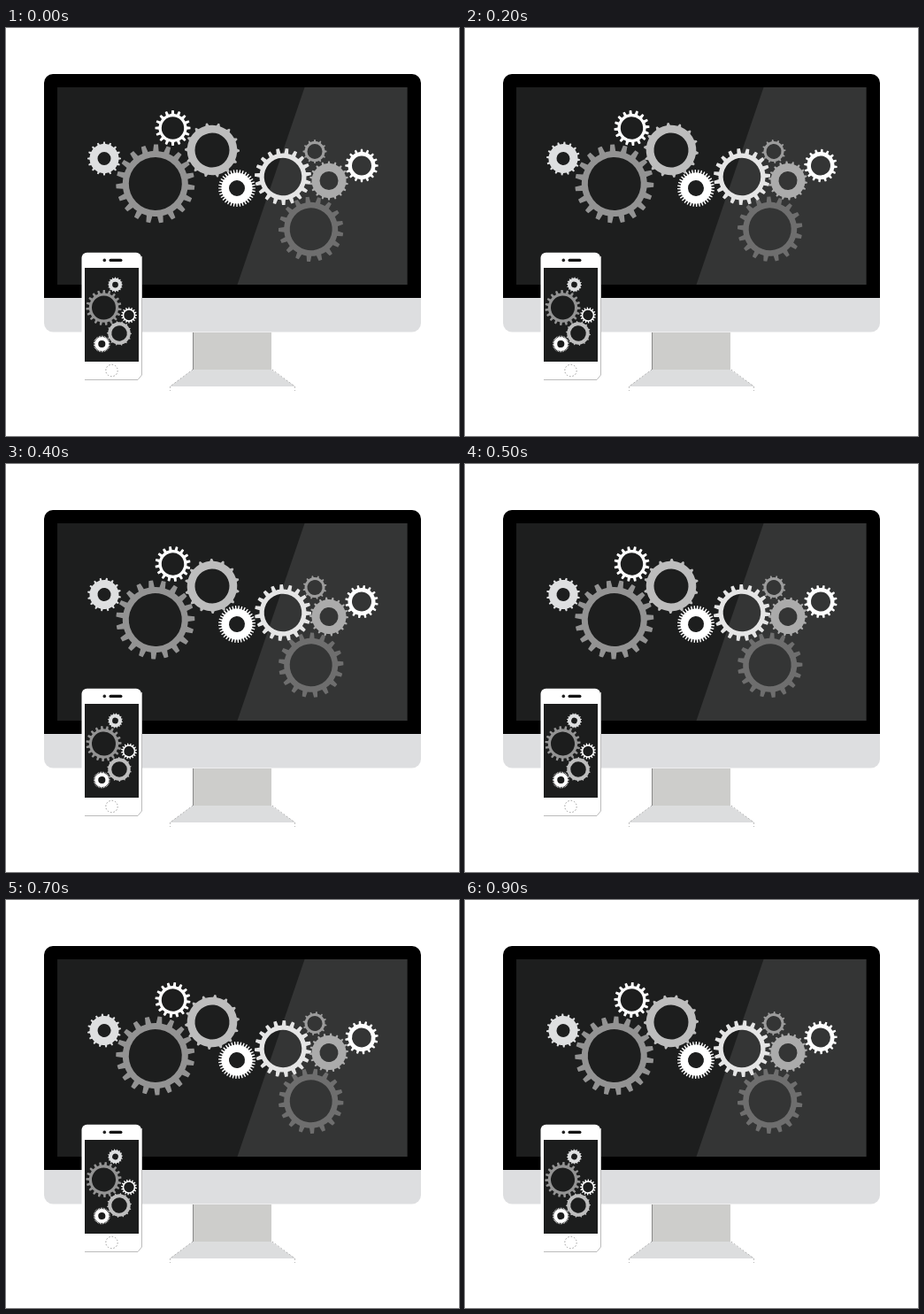
An HTML page with a canvas that plays this animation: 512x461 px, repeating every 1 s.

```html
<!DOCTYPE html>
<html lang="en">
<head>
<meta charset="utf-8">
<title>Gears on screens</title>
<style>
html, body { margin: 0; width: 100%; height: 100%; overflow: hidden; background: #fff; }
canvas { display: block; }
</style>
</head>
<body>
<canvas id="stage" width="512" height="461"></canvas>
<script>
const ctx = document.getElementById('stage').getContext('2d');
const TAU = Math.PI * 2;

// A negative tooth count turns the gear anticlockwise.
const kind = (hole, body, tip, teeth, fill, phase = 0) => ({ hole, body, tip, teeth, fill, phase });
const pale = kind(7.5, 16.5, 19, 16, '#dedfe0');
const big = kind(30, 37, 44.5, -19, '#939393', -0.05);
const thin = kind(12.7, 16, 20, -16, '#fff');
const light = kind(19.5, 28.3, 31, 14, '#bdbdbd', -0.45);
const fine = kind(9, 17.5, 21, -36, '#fff');
const wide = kind(21.3, 26.5, 32, 19, '#e5e5e5', 0.43);
const small = kind(8.5, 11.5, 13.5, -12, '#9c9c9c');
const grey = kind(10.5, 19.5, 22, -18, '#ababab');
const round = kind(11, 15.5, 18.7, 16, '#fff');
const dark = kind(24, 30.5, 36.7, 17, '#6e6e6e', -0.3);

function box(x, y, w, h, r, fill) {
  ctx.beginPath();
  ctx.roundRect(x, y, w, h, r);
  ctx.fillStyle = fill;
  ctx.fill();
}

function trace(...pts) {
  ctx.beginPath();
  for (const [x, y] of pts) ctx.lineTo(x, y);
}

function poly(fill, ...pts) {
  trace(...pts);
  ctx.fillStyle = fill;
  ctx.fill();
}

function stroke(color, dash = []) {
  ctx.lineWidth = 1;
  ctx.strokeStyle = color;
  ctx.setLineDash(dash);
  ctx.stroke();
}

function gear({ hole, body, tip, teeth, fill, phase }, x, y, turn, scale = 1) {
  const pitch = TAU / Math.abs(teeth);
  const top = Math.min(pitch * 0.17, (tip - body) * 0.32 / tip);
  const root = top + pitch * 0.1;
  ctx.save();
  ctx.translate(x, y);
  ctx.scale(scale, scale);
  ctx.rotate((phase + turn) * TAU / teeth - TAU / 4);
  ctx.beginPath();
  for (let a = 0; a < TAU - pitch / 2; a += pitch) {
    ctx.arc(0, 0, tip, a - top, a + top);
    ctx.arc(0, 0, body, a + root, a + pitch - root);
  }
  ctx.closePath();
  ctx.moveTo(hole, 0);
  ctx.arc(0, 0, hole, 0, TAU);
  ctx.fillStyle = fill;
  ctx.fill('evenodd');
  ctx.restore();
}

function monitor(turn) {
  box(43, 52, 426, 253, [10, 10, 0, 0], '#000');
  box(43, 305, 426, 38.5, [0, 0, 10, 10], '#dddee0');
  box(58, 67, 395.5, 223, 0, '#1d1e1e');
  poly('#343535', [337.5, 67], [453.5, 67], [453.5, 290], [261.5, 290]);

  box(211, 344, 89, 42, 0, '#cdcdcb');
  trace([211.5, 344], [211.5, 386]);
  stroke('#888');
  poly('#dcddde', [211, 386], [300, 386], [327, 405], [185, 405]);
  for (const side of [-1, 1]) {
    trace([256 + side * 45, 386], [256 + side * 70.5, 405], [256 + side * 70.5, 410]);
    stroke('#aaa', [1.5, 2.5]);
  }

  gear(pale, 111, 147.5, turn);
  gear(big, 168.8, 176, turn);
  gear(thin, 188.5, 113, turn);
  gear(light, 233, 138, turn);
  gear(fine, 261, 181, turn);
  gear(dark, 344.7, 227.3, turn);
  gear(wide, 313, 168, turn);
  gear(small, 349, 139.5, turn);
  gear(grey, 365, 172.5, turn);
  gear(round, 402, 155.5, turn);
}

function phone(turn) {
  box(85.5, 253.7, 67.5, 143.5, 6, '#fff');
  trace([153.5, 258], [153.5, 392], [149, 397.5], [89, 397.5]);
  stroke('#bbb');
  box(89, 271, 61, 106, 0, '#1c1d1d');
  box(109.5, 260.6, 3.6, 3.6, 1.8, '#222');
  box(116.5, 260.7, 15, 3.4, 1.7, '#111');
  ctx.beginPath();
  ctx.arc(119.5, 387, 6.7, 0, TAU);
  stroke('#999', [1.5, 2]);

  const scale = 0.45;
  gear(pale, 123.5, 290, turn, scale);
  gear(big, 110.5, 316, turn, scale);
  gear(thin, 139, 324.5, turn, scale);
  gear(light, 128, 345, turn, scale);
  gear(fine, 108.3, 357, turn, scale);
}

// Every gear advances one tooth per second, in ten hard steps.
function frame() {
  const turn = Math.floor(performance.now() % 1000 / 100) / 10;
  ctx.fillStyle = '#fff';
  ctx.fillRect(0, 0, 512, 461);
  monitor(turn);
  phone(turn);
  requestAnimationFrame(frame);
}
frame();
</script>
</body>
</html>
```
